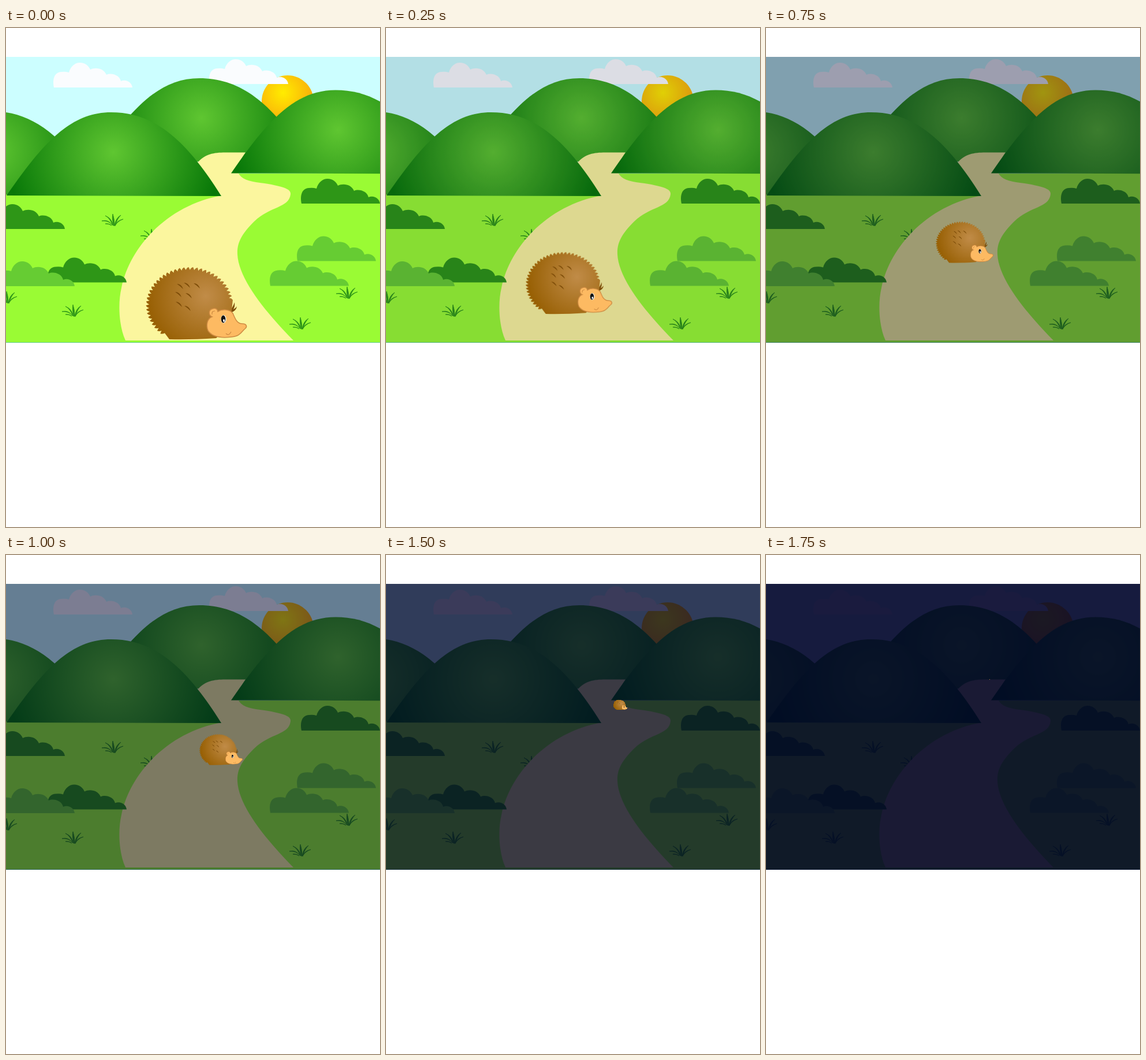
Animation of 648x864 px, one loop 2000 ms. Source, as an HTML page:

```html
<!DOCTYPE html>
<html lang="en">
<head>
<meta charset="utf-8">
<title>Hedgehog at dusk</title>
<style>
  html, body { margin: 0; width: 100%; height: 100%; overflow: hidden; background: #fff; }
  svg { display: block; width: 100vw; height: 100vh; }
  #dusk { fill: #000028; animation: dusk 2s step-end infinite; }
  #hedgehog { transform-origin: 0 0; animation: walk 2s step-end infinite; }

  @keyframes dusk {
    0% { opacity: 0; }
    12.5% { opacity: .122; }
    25% { opacity: .245; }
    37.5% { opacity: .373; }
    50% { opacity: .503; }
    62.5% { opacity: .635; }
    75% { opacity: .765; }
    87.5%, 100% { opacity: .895; }
  }
  @keyframes walk {
    0% { transform: translate(330px, 476px) scale(1); }
    12.5% { transform: translate(317px, 441px) scale(.857); }
    25% { transform: translate(320px, 406.5px) scale(.714); }
    37.5% { transform: translate(344px, 370.5px) scale(.571); }
    50% { transform: translate(372.5px, 336.5px) scale(.429); }
    62.5% { transform: translate(397px, 300.5px) scale(.286); }
    75% { transform: translate(406px, 259px) scale(.143); }
    87.5%, 100% { transform: translate(387.5px, 215.5px) scale(.01); }
  }
</style>
</head>
<body>
<svg viewBox="0 0 648 864" preserveAspectRatio="none">
  <defs>
    <clipPath id="stage"><rect y="50" width="648" height="495"/></clipPath>
    <radialGradient id="hillFill" gradientUnits="userSpaceOnUse" cx="186" cy="215" r="186">
      <stop offset="0" stop-color="#5fc631"/>
      <stop offset="1" stop-color="#087808"/>
    </radialGradient>
    <radialGradient id="sunFill" gradientUnits="userSpaceOnUse" cx="480" cy="112" r="62">
      <stop offset="0" stop-color="#ffec00"/>
      <stop offset="1" stop-color="#f9a40c"/>
    </radialGradient>
    <radialGradient id="furFill" gradientUnits="userSpaceOnUse" cx="346" cy="464" r="100">
      <stop offset="0" stop-color="#c18c48"/>
      <stop offset="1" stop-color="#986004"/>
    </radialGradient>
    <path id="hill" fill="url(#hillFill)" d="M1 290C62 202 110 146 182 146C255 146 310 190 373 291Z"/>
    <path id="puff" d="M1 0C-1-10-1-26 14-27Q21-28 27-26C30-37 38-43 46-43C55-43 61-38 64-31C73-36 88-33 92-22C101-26 115-21 117-11C126-15 136-9 137 0Z"/>
    <path id="tuft" d="M0 8Q-6 0-18 1Q-7-2 0 8M1 9Q-4-4-12-8Q-1-4 2 9M3 10Q-1-2 1-11Q4-2 4 9M4 9Q6-4 15-9Q8-2 5 10M5 9Q8 0 19-2Q10 1 5 9M-1 9Q-5 5-12 6Q-5 6-1 9"/>
    <path id="tick" d="M-6-4Q2-4 5 5Q0 0-6-4Z"/>
  </defs>

  <g clip-path="url(#stage)">
    <rect y="50" width="648" height="210" fill="#ccfeff"/>
    <circle cx="488" cy="127" r="45" fill="url(#sunFill)"/>
    <g fill="#fafcfe">
      <use href="#puff" x="82" y="103"/>
      <use href="#puff" x="352" y="97"/>
    </g>
    <use href="#hill" x="153" y="-59"/>
    <rect y="252" width="648" height="293" fill="#9afb34"/>

    <g fill="#2d9418" stroke="#2d9418" stroke-width=".8">
      <use href="#tuft" x="184" y="333"/>
      <use href="#tuft" x="251" y="359"/>
      <use href="#tuft" x="115" y="490"/>
      <use href="#tuft" x="0" y="467"/>
      <use href="#tuft" x="590" y="459"/>
      <use href="#tuft" x="509" y="512"/>
    </g>

    <path fill="#fbf69e" d="M331 234C345 218 360 215.500 380 215.500L415 215.500Q398 240 403 252C410 264 425 266 448 269C485 275 494 280 493 288C490 312 458 308 430 335C408 357 400 372 401 392C403 435 450 492 498 541L207 541C195 515 194 475 200 450C215 375 285 305 374 290L340 290Z"/>

    <use href="#hill" x="-208" y="-2"/>
    <use href="#hill"/>
    <use href="#hill" x="389" y="-38.500"/>

    <g fill="#2e9617">
      <use href="#puff" x="-35" y="348"/>
      <use href="#puff" x="72" y="440.500"/>
      <use href="#puff" x="511" y="304"/>
    </g>
    <g fill="#66cc33">
      <use href="#puff" x="-18" y="447"/>
      <use href="#puff" x="504" y="403.500"/>
      <use href="#puff" x="457" y="446.500"/>
    </g>
    <rect y="544" width="648" height="1" fill="#5fcf8c"/>
    <rect id="dusk" y="50" width="648" height="495"/>

    <g id="hedgehog">
      <g transform="translate(-330 -476)">
        <path fill="#7d4c08" d="M388 489Q393 484 396 475Q397 482 394 487Q398 485 400 482Q399 490 389 493Z"/>
        <path id="fur" fill="url(#furFill)"/>
        <g fill="#7d4c08">
          <use href="#tick" x="302" y="447"/>
          <use href="#tick" x="314" y="445"/>
          <use href="#tick" x="331" y="446"/>
          <use href="#tick" x="299" y="461"/>
          <use href="#tick" x="317" y="463"/>
          <use href="#tick" x="300" y="478"/>
          <use href="#tick" x="315" y="485"/>
        </g>
        <path fill="#fdba62" stroke="#cd8a42" stroke-width="1.500" d="M357 500C351 498 350 488 358 486C364 484 367 488 367 491C375 486 388 487 393 494C397 503 400 512 409 512C417 512 418 517 415 520C408 525 407 534 390 535C372 537 357 535 350 524C346 514 349 503 357 500Z"/>
        <g fill="none" stroke="#cd8a42" stroke-width="1.200">
          <path d="M357 496Q356 490 362 490"/>
          <path d="M381 529Q386 534 390 526"/>
        </g>
        <ellipse cx="377" cy="504" rx="4.600" ry="7" fill="#fff"/>
        <ellipse cx="376.500" cy="504" rx="3.800" ry="6.500" fill="#111"/>
        <ellipse cx="377.500" cy="506.500" rx="1.500" ry="2.500" fill="#fff"/>
      </g>
    </g>
  </g>
</svg>
<script>
  // Spiky back: tips and notches around an ellipse, from lower left over the top to the head.
  const spikes = 38, from = 128, sweep = 226;
  const at = (deg, r) => {
    const a = deg * Math.PI / 180;
    return `${(318 + 72 * r * Math.cos(a)).toFixed(1)} ${(480 + 63 * r * Math.sin(a)).toFixed(1)}`;
  };
  let d = "M283 539";
  for (let i = 0; i < spikes; i++) {
    const deg = from + sweep * i / spikes;
    d += `L${at(deg, .97)}Q${at(deg + 1, 1.03)} ${at(deg + 4, 1.05)}`;
  }
  d += "L391 490L385 520L364 537Q320 540 283 539Z";
  document.getElementById("fur").setAttribute("d", d);
</script>
</body>
</html>
```
